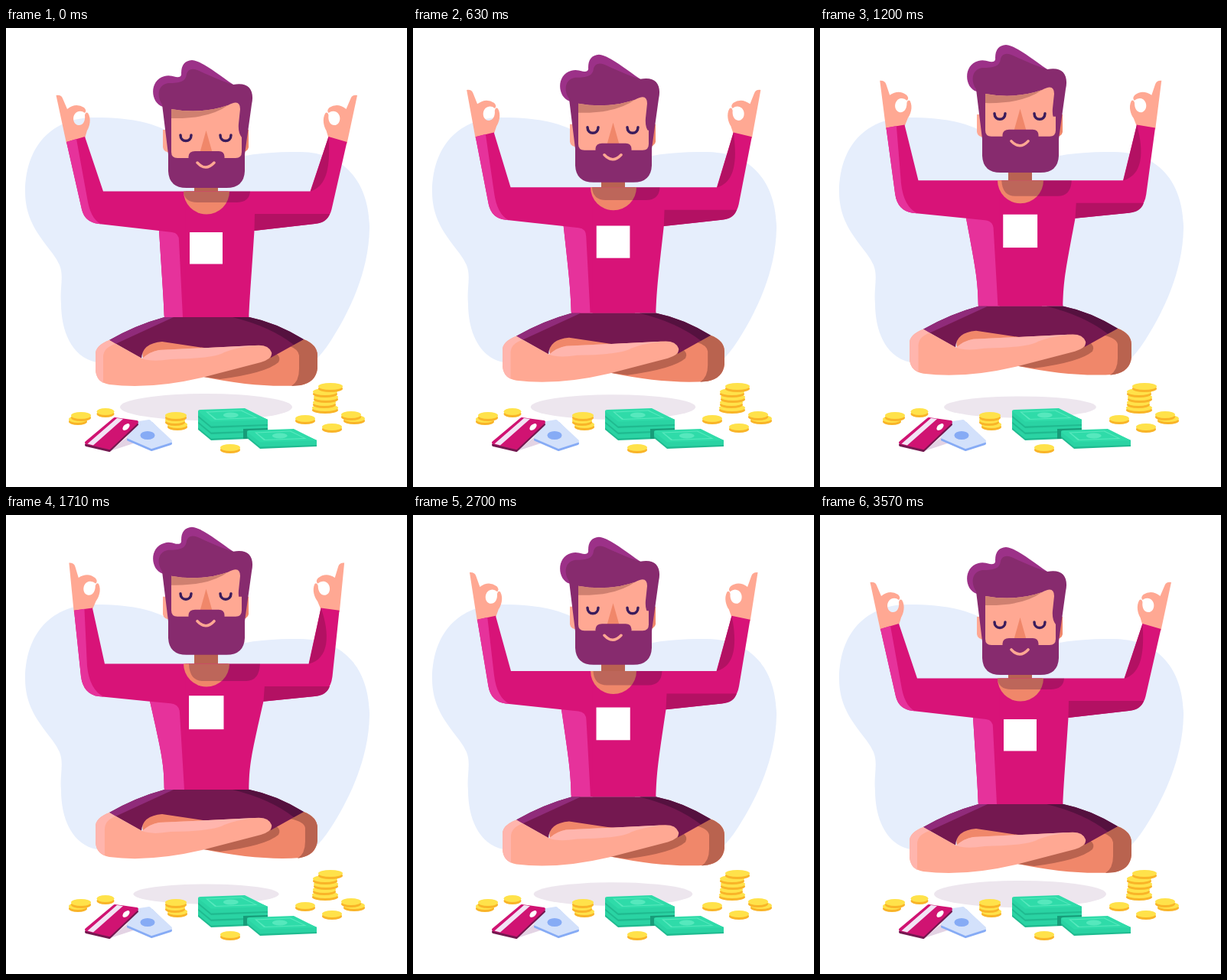
Write an HTML page that moves like this. It is 524x600 px and loops after 3600 ms.

```html
<!DOCTYPE html>
<html lang="en">
<head>
<meta charset="utf-8">
<title>Floating meditation</title>
<style>
html, body { margin: 0; width: 100%; height: 100%; overflow: hidden; background: #fff; }
svg { display: block; width: 524px; height: 600px; }
</style>
</head>
<body>
<svg viewBox="0 0 524 600">
  <path fill="#e6eefc" d="M25 214C26 146 68 117 115 117C165 117 205 124 232 150C250 167 262 180 285 174C320 163 350 162 385 162C445 163 475 205 475 262C474 320 448 372 425 408Q413 427 400 438L118 437C85 430 72 395 72 360C70 340 76 325 70 310C60 286 25 264 25 214Z"/>
  <ellipse id="shadow" cx="261.5" cy="495.5" fill="#ede6ee"/>

  <g id="body">
    <path fill="#b96252" d="M246 165H277V216H246Z"/>
    <g id="side">
      <path id="hand" fill="#ffa893" fill-rule="evenodd" d="M65.500 88Q72 87 74 92L80 106Q91 97 102 104Q106 108 103 111Q99 108 95 109C86 111 86 125 94 127C101 128 104 121 103 114Q104 109 107 111C112 119 109 129 106 134L103 144L79 151Z"/>
      <path id="half" fill="#d81378"/>
    </g>
    <use href="#side" transform="translate(524.5)scale(-1 1)"/>
    <path id="sleeveLight" fill="#e6329b"/>
    <path id="torsoLight" fill="#e6329b"/>
    <path id="armShade" fill="#b31163"/>
    <path fill="#f0876a" d="M232 213.500A30 30 0 0 0 292 213.500Z"/>
    <path id="headShade" fill="#3a1030" opacity=".28"/>
    <rect id="badge" fill="#fff"/>

    <path fill="#f0876a" d="M180 435Q172 412 200 408H300L389 407Q407 414 407 428V445Q405 463 385 467Q330 471 258 456Z"/>
    <path id="kneeShade" fill="#b9634f"/>
    <path fill="#b9634f" d="M258 456L352 425Q360 430 356 437Q340 451 280 459Z"/>
    <path fill="#741850" d="M207 378H318Q353 385 389 407L346 431Q343 415 325 415L272 420L204 410Q178 412 177 432L135 408Q170 388 207 378Z"/>
    <path fill="#902b7a" d="M207 378H219L143 413L135 408Q170 388 207 378Z"/>
    <path fill="#55113f" d="M296 378H318Q353 385 389 407L376 414Q345 390 296 378Z"/>
    <path fill="#ffa893" d="M135 408Q117 415 117 426V447Q118 463 135 466Q190 473 260 456L333 437Q349 432 347 424Q343 413 325 415L200 421Q188 423 178 432Z"/>
    <path id="kneeLight" fill="#ffb5ad"/>
    <path fill="#ffb5ad" d="M178 432Q188 423 200 421L325 415Q300 418 285 424Q272 432 215 433Q190 437 178 432Z"/>
  </g>

  <g id="head">
    <path fill="#ffa893" d="M216 133H205V156Q206 163 216 163Z"/>
    <path fill="#f0876a" d="M306 133H317V156Q316 162 306 163Z"/>
    <path fill="#9c3188" d="M205 103C188 98 187 68 207 63Q213 61 222 64Q230 65 229 59Q229 43 243 42C258 44 276 60 297 74V103Z"/>
    <path fill="#872b6e" d="M204 100C196 88 199 74 212 72C228 72 235 70 236 60Q239 51 250 55C266 62 280 69 297 74C318 70 325 82 321 100L312 165V187Q311 209 288 209H236Q213 209 212 187V165Z"/>
    <path fill="#ffa893" d="M216 106Q255 113 290 101Q306 92 306 106L304 125Q303 137 308 143V145H216Z"/>
    <path fill="#cf8070" d="M216 106Q255 113 290 101Q265 119 216 118Z"/>
    <g id="face">
      <path fill="#ffa893" d="M216 144H308V162Q308 170 300 170H224Q216 170 216 162Z"/>
      <path fill="#f0876a" d="M261.500 134L253 164H270Z"/>
      <path fill="#872b6e" d="M238.500 171V168Q239 161 247 161H278Q285 161 285.500 168V171Z"/>
      <g fill="none" stroke="#3a1c5c" stroke-width="3.500" stroke-linecap="round">
        <path d="M228 140C228 150 242 150 242 140M280 140C280 150 294 150 294 140"/>
        <path stroke="#ffa893" d="M250 176Q261 188 272 176"/>
      </g>
    </g>
  </g>

  <g id="props">
    <path fill="#e3d3e4" d="M136 553L176 520L188 536Z"/>
    <g stroke-linejoin="round" stroke-width="4">
      <path fill="#86abf5" stroke="#86abf5" d="M160 538L190 551L215 543L190 517Z"/>
      <path fill="#d3e1fb" stroke="#d3e1fb" d="M160 535L190 548L215 540L187 514L174 516Z"/>
      <ellipse cx="185" cy="532.500" rx="9.500" ry="5.500" fill="#86abf5"/>
      <path fill="#741850" stroke="#741850" d="M105 545L135 552L171 518L142 513Z"/>
      <path fill="#d01372" stroke="#d01372" d="M105 542L135 549L171 515L142 511Z"/>
    </g>
    <path fill="#f2e4f5" d="M106.500 543.500L114 545.500L153 511L145 510Z"/>
    <ellipse cx="157" cy="521.500" rx="5.500" ry="3.200" fill="#fff" transform="rotate(-42 157 521.5)"/>
  </g>
</svg>
<script>
const $ = id => document.getElementById(id);
const set = (el, attrs) => { for (const a in attrs) el.setAttribute(a, attrs[a]); };
const add = (name, attrs) => {
  const el = document.createElementNS('http://www.w3.org/2000/svg', name);
  set(el, attrs);
  $('props').append(el);
};

function bill(x, y, w) {
  const path = (fill, d) => add('path', { fill, d, transform: `translate(${x} ${y})` });
  const right = w - 30;
  path('#1fbb90', `M0 2L${right} 0L${w} 13V21L17 24L0 10Z`);
  path('#2ad3a3', `M0 2L${right} 0L${w} 13V19L17 21.5L0 7.5Z`);
  path('#2fdba9', `M0 2Q0 0 3 0L${right} -2L${w} 13L17 15.500Z`);
  path('#56e8bd', `M10 2.5L${right - 4} .5L${w - 13} 11L22 13ZM13 3.500L24 12L${w - 17} 10L${right - 5} 1.500Z`);
  add('ellipse', { cx: x + w * .47, cy: y + 7, rx: 10, ry: 3.5, fill: '#56e8bd' });
}
function coin(x, y, rx = 13) {
  add('ellipse', { cx: x, cy: y + 2.5, rx, ry: 4.5, fill: '#f9b428' });
  add('ellipse', { cx: x, cy: y - .5, rx, ry: 4.5, fill: '#ffe24a' });
}
for (const y of [515, 507, 499]) bill(251, y, 91);
add('path', { fill: '#179c79', d: 'M310 524L342 523V531L330 537H310Z' });
bill(315, 526, 91);
[[94, 512, 12], [98, 507], [130, 502, 11.5], [224, 519], [221, 513], [222, 507, 14],
 [293, 549], [391, 511], [426, 522], [455, 511, 14], [451, 506],
 [417, 497, 17], [416, 490, 15], [418, 483, 16], [417, 476, 16], [424, 469, 16]]
  .forEach(c => coin(...c));

function draw(now) {
  const k = (1 - Math.cos(now / 3600 * 2 * Math.PI)) / 2;
  const mix = (a, b) => a + (b - a) * k;
  const pt = (x0, y0, x1, y1) => mix(x0, x1) + ' ' + mix(y0, y1) + ' ';
  const mirrored = (x0, y0, x1, y1) => pt(524.5 - x0, y0, 524.5 - x1, y1);
  const path = (id, d) => $(id).setAttribute('d', d);
  const lift = (id, height) => set($(id), { transform: `translate(0 ${-height * k})` });

  const cuff = [79, 149, 89, 143.5], inner = [103, 142, 113, 140.5], pit = [200, 265, 188, 262.5];
  const flank = `L207 378C${pt(205.5, 345, 206.5, 345)} ${pt(204.3, 333, 204.5, 335)} ${pt(...pit)}`;
  const elbow = `L121 256Q${pt(103, 254, 101, 253)} ${pt(99, 237, 98, 230)}L${pt(...cuff)}Z`;

  set($('shadow'), { rx: mix(112.5, 95), ry: mix(17.5, 13) });
  lift('body', 19);
  lift('head', 26.5);
  lift('face', 11);
  set($('hand'), { transform: `translate(${10 * k} ${-5.5 * k})rotate(${6.5 * k} 79 149)` });
  set($('badge'), { x: mix(240, 239), y: mix(267, 255), width: mix(43, 45.5), height: mix(41.5, 44) });

  path('half', `M${pt(...inner)}L${pt(127, 213.5, 129, 213.5)}H290V378${flank}${elbow}`);
  path('sleeveLight', `M${pt(92, 145, 102.5, 141.5)}L${pt(106, 222, 106, 216)}Q${pt(110, 249, 109, 247)} ${pt(124, 256.3, 128, 256.7)}${elbow}`);
  path('torsoLight', `M${pt(...pit)}L${pt(217, 267, 215, 265)}Q${pt(226, 268, 227, 266)} ${pt(226, 278, 227, 278)}L${pt(231, 378, 233, 378)}${flank}Z`);
  path('armShade', `M${mirrored(...inner)}C${pt(424, 180, 424, 176)} ${pt(420, 207, 422, 207)} ${pt(398, 213.5, 396, 213.5)}Z
    M${mirrored(...pit)}L${pt(325, 243, 338, 243)}H423Q419 255 403.5 256Z`);
  const knee = mix(383, 391);
  path('kneeShade', `M389 407Q407 414 407 428V445Q405 463 385 467L${knee - 10} 468Q${knee} 462 ${knee} 446V428Q${knee - 1} 420 371 416Z`);
  const shin = mix(127, 129);
  path('kneeLight', `M135 408Q117 415 117 426V447Q118 460 ${shin} 464V430Q${shin} 418 143 413Z`);
  const l = mix(232, 239), r = mix(319, 332), b = mix(228, 236);
  path('headShade', `M${l} 213.5Q${l + 1} ${b} ${l + 18} ${b}H${r - 18}Q${r - 1} ${b} ${r} 213.5Z`);
}
function tick() {
  draw(performance.now());
  requestAnimationFrame(tick);
}
tick();
</script>
</body>
</html>
```
